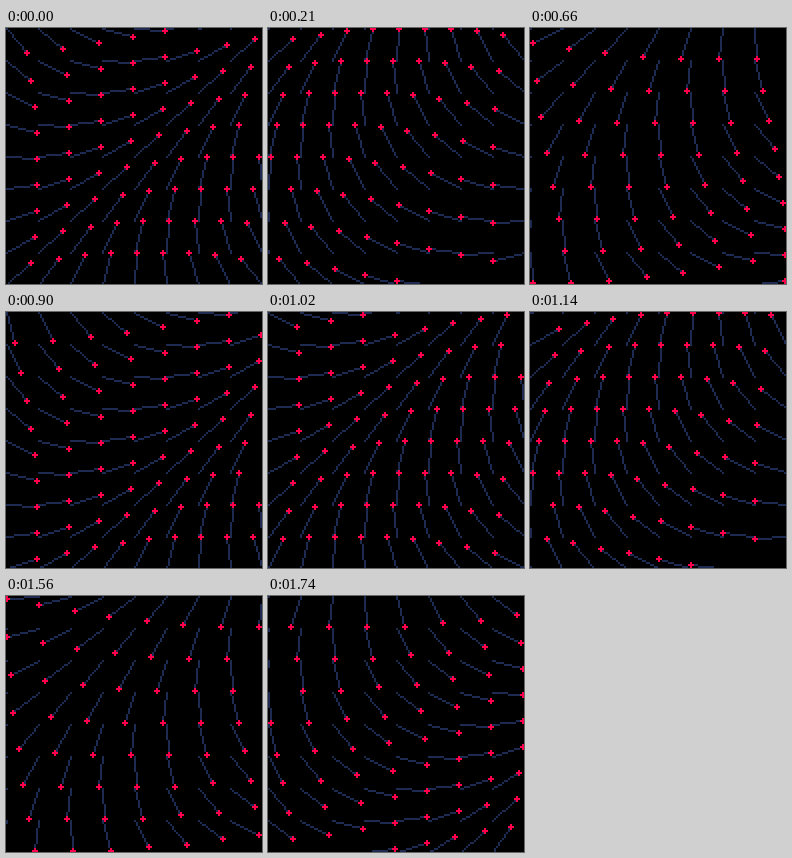
These frames come from a looping animation (256 px wide and 256 px high, 1770 ms). An HTML page with a canvas:

```html
<!DOCTYPE html>
<html lang="en">
<head>
<meta charset="utf-8">
<title>Turning needles</title>
<style>
  html, body { margin: 0; width: 100%; height: 100%; overflow: hidden; background: #000; }
  canvas { display: block; width: 256px; height: 256px; image-rendering: pixelated; }
</style>
</head>
<body>
<canvas id="stage" width="128" height="128"></canvas>
<script>
const ctx = document.getElementById('stage').getContext('2d');
const NAVY = '#1d2b53', RED = '#ff004d';
const STEP_MS = 30, STEPS = 59;
const GAP = 16, CELLS = 8;
const START = 51.045, TURN = 11.28, SHIFT = 11.25; // degrees

function line(x, y, dx, dy) {
  const n = Math.max(Math.abs(dx), Math.abs(dy));
  for (let k = 0; k <= n; k++) {
    ctx.fillRect(x + Math.round(dx * k / n), y + Math.round(dy * k / n), 1, 1);
  }
}

function plus(x, y) {
  ctx.fillRect(x - 1, y, 3, 1);
  ctx.fillRect(x, y - 1, 1, 3);
}

function draw(step) {
  ctx.fillStyle = '#000';
  ctx.fillRect(0, 0, 128, 128);
  for (let i = 0; i <= CELLS; i++) {
    for (let j = 0; j <= CELLS; j++) {
      const angle = (START - TURN * step - SHIFT * (i + j)) * Math.PI / 180;
      const dx = Math.floor(GAP * Math.cos(angle));
      const dy = Math.floor(GAP * Math.sin(angle));
      const x = i * GAP, y = j * GAP;
      ctx.fillStyle = NAVY;
      line(x, y, dx, dy);
      ctx.fillStyle = RED;
      plus(x + dx, y + dy);
    }
  }
}

const begin = performance.now();
function tick() {
  draw(Math.floor((performance.now() - begin) / STEP_MS) % STEPS);
  requestAnimationFrame(tick);
}
tick();
</script>
</body>
</html>
```
